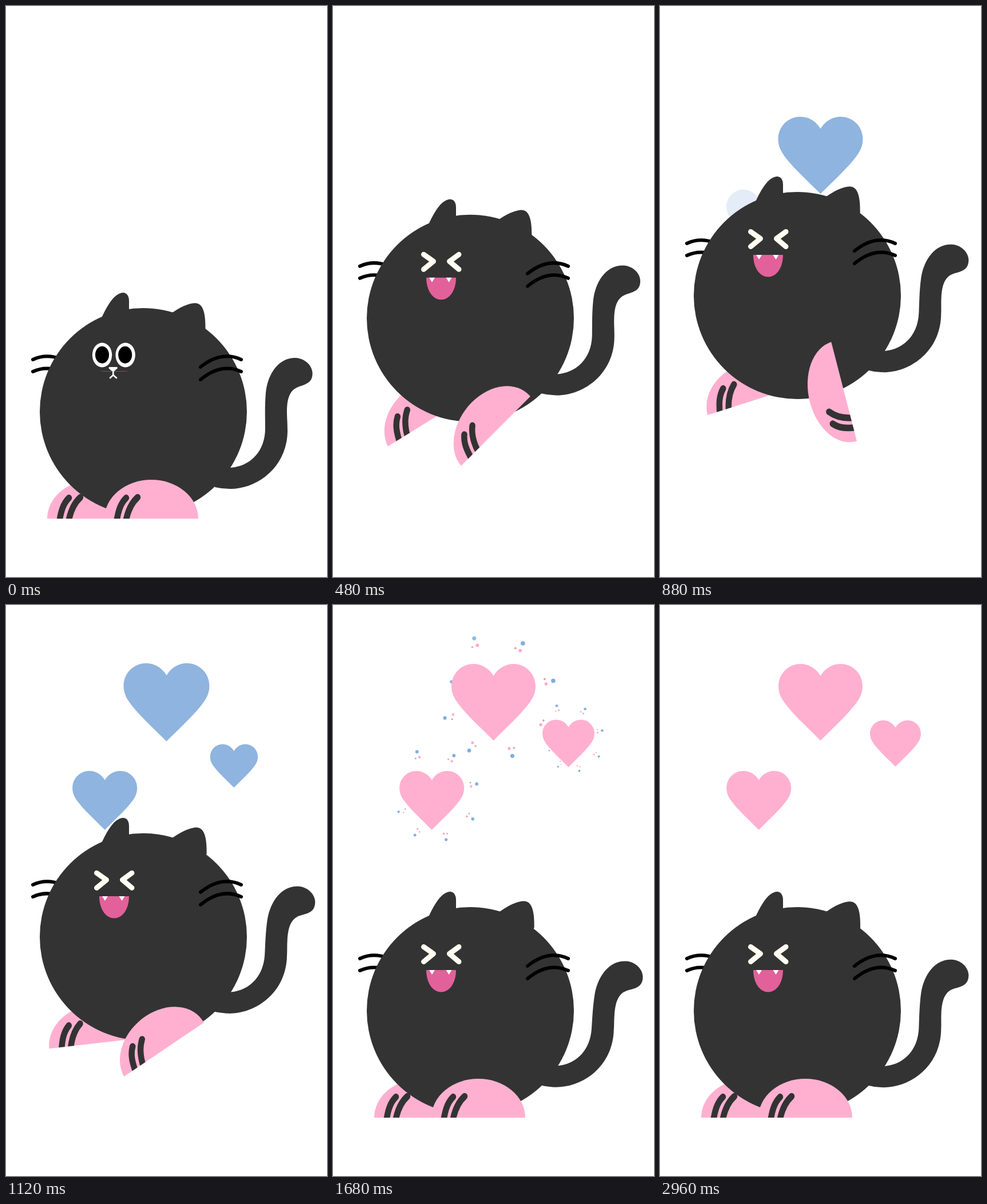
These frames come from a looping animation (561 px wide and 998 px high, 3 s). An HTML page:

```html
<!DOCTYPE html>
<html lang="en">
<head>
<meta charset="utf-8">
<title>Jumping cat</title>
<style>
  html, body { margin: 0; width: 100%; height: 100%; overflow: hidden; background: #fff; }
  svg { display: block; width: 100%; height: 100%; }
  .fur { fill: #333; }
  .line { fill: none; stroke-linecap: round; stroke-linejoin: round; }
  .whisker { stroke: #000; stroke-width: 6; }
  .toe { stroke: #333; stroke-width: 10.5; }
  .squint { stroke: #fffff2; stroke-width: 9; }
</style>
</head>
<body>
<svg viewBox="0 0 561 998">
  <defs>
    <clipPath id="sole"><rect x="-90" y="-70" width="180" height="70"/></clipPath>
    <path id="heart" d="M0-46C-8-60-22-67-35-67C-56-67-73.5-50-73.5-28C-73.5-18-70-9-63.5 0C-50 19-26 41 0 67C26 41 50 19 63.5 0C70-9 73.5-18 73.5-28C73.5-50 56-67 35-67C22-67 8-60 0-46Z"/>
    <g id="foot" clip-path="url(#sole)">
      <ellipse rx="82" ry="62" fill="#ffb0d0"/>
      <path class="line toe" d="M-61 6C-58-12-54-24-44-33M-45 6C-42-10-36-24-24-34"/>
    </g>
    <path id="whiskers" class="line whisker" d="M340 631Q376 602 411 618M340 653Q376 623 411 639"/>
  </defs>
  <g id="sparks"></g>
  <g id="hearts"></g>
  <g id="cat">
    <path id="tail" class="fur" d="M365 841Q378 844 392 844C440 844 492 805 492 742C492 725 491 722 491 710C491 690 494 674 508 667C514 664 521 663 527 659C534 655 536 648 535.5 640C534 626 520 615 505 615C478 615 458 640 454 676C452 700 453 720 453 738C453 780 425 805 392 807Q380 807 360 800Z"/>
    <use href="#whiskers" transform="matrix(-1 0 0 1 458 0)"/>
    <use id="rear" href="#foot"/>
    <path class="fur" d="M164 552C172 533 183 512 194 505Q200 501 205 501Q215 502 215 516L215 550Z"/>
    <path id="ear" class="fur" d="M285 540Q308 523 324 520C343 515 349 532 348.5 565L340 585Z"/>
    <circle class="fur" cx="240" cy="709" r="181"/>
    <use id="front" href="#foot"/>
    <use href="#whiskers"/>
    <g id="calm">
      <g fill="#fff">
        <ellipse cx="168" cy="610" rx="17.2" ry="21.5"/>
        <ellipse cx="208.7" cy="610" rx="17.2" ry="21.5"/>
      </g>
      <ellipse cx="168" cy="609.7" rx="12" ry="15"/>
      <ellipse cx="208.2" cy="609.7" rx="12" ry="15"/>
      <path d="M181 632.5H193.5L187.3 638Z" fill="#fff" stroke="#fff" stroke-width="3" stroke-linejoin="round"/>
      <path class="line" stroke="#fff" stroke-width="2.6" d="M187.3 638V645M182 650L187.3 645L193 650"/>
    </g>
    <path id="squint" class="line squint" d="M158.5 597.5L175.5 609.5L158.5 623.5M220 597.5L203.5 609.5L220 623.5"/>
    <g id="mouth">
      <path fill="#e2619a" d="M-26 0H26C26 22 15 38.5 0 38.500S-26 22-26 0Z"/>
      <path fill="#fff" d="M-21 0H-11L-16 8ZM8.500 0H18.500L13.500 8Z"/>
    </g>
  </g>
</svg>
<script>
const LOOP = 3000, STEP = 40, GROUND = 896;
const BLUE = [143, 180, 223], PINK = [255, 176, 208];
const $ = id => document.getElementById(id);
const linear = p => p;
const smooth = p => (1 - Math.cos(Math.PI * p)) / 2;
const clamp = p => Math.min(1, Math.max(0, p));

// Value at time t from [time, value] steps
function track(t, steps, ease = smooth) {
  let [t0, v0] = steps[0];
  for (const [t1, v1] of steps) {
    if (t <= t1) return t1 === t0 ? v1 : v0 + (v1 - v0) * ease((t - t0) / (t1 - t0));
    t0 = t1; v0 = v1;
  }
  return v0;
}

const jump = [[286, 0], [560, -203], [960, -203], [1348, 0]];
const frontTurn = [[170, 0], [880, 105.8], [1260, 0]];
const rearTurn = [[60, 0], [280, 36.5], [480, 29.4], [880, 16.2], [1260, 0]];
const tailTurn = [[0, 0], [480, 1], [880, 2.7], [1280, 3.8], [1680, 4.3], [2320, 4.3], [2960, 2.7]];
const earShift = [[0, 0], [480, -1.2], [880, 1.2], [1280, 2.8], [1680, 3.2], [2320, 3.2], [2960, 1.6]];

const hearts = [
  { x: 280.5, y: 170, size: 1, dx: 0, dy: 220, rise: [680, 1040], show: [640, 720], burst: 996, blush: 1360,
    scale: [[880, 1.007], [1060, 1.03], [1280, .973], [1500, 1]] },
  { x: 172.7, y: 341.5, size: .769, dx: 0, dy: 40, rise: [780, 1100], show: [840, 1000], burst: 1055, blush: 1400,
    scale: [[880, .769], [1100, .769], [1280, .782], [1500, .769]] },
  { x: 411.5, y: 242, size: .61, dx: -20, dy: 60, rise: [960, 1360], show: [960, 1080], burst: 1145, blush: 1440,
    scale: [[960, .5], [1280, .633], [1680, .618], [2320, .605]] },
];
// Three dots travel together in each of eight directions
const dots = [
  { color: "#80aede", reach: 116, side: 0, size: 4, delay: 0 },
  { color: "#ffa9cb", reach: 103, side: 2, size: 3, delay: 40 },
  { color: "#d3a79f", reach: 102, side: -8, size: 2, delay: 0 },
];

function add(parent, name, attrs) {
  const el = document.createElementNS("http://www.w3.org/2000/svg", name);
  for (const key in attrs) el.setAttribute(key, attrs[key]);
  return parent.appendChild(el);
}
const place = (el, value) => el.setAttribute("transform", value);
const show = (el, on) => el.setAttribute("visibility", on ? "visible" : "hidden");

const sparks = [];
for (const heart of hearts) {
  heart.el = add($("hearts"), "use", { href: "#heart" });
  for (let i = 0; i < 8; i++)
    for (const dot of dots)
      sparks.push({ heart, dot, start: heart.burst + i * 66 + dot.delay,
        angle: i * 45 - 107, el: add($("sparks"), "circle", { fill: dot.color }) });
}

function drawHeart(h, t) {
  const left = 1 - smooth(clamp((t - h.rise[0]) / (h.rise[1] - h.rise[0])));
  const mix = clamp((t - h.blush) / 120);
  const color = BLUE.map((c, i) => Math.round(c + (PINK[i] - c) * mix));
  place(h.el, `translate(${h.x + h.dx * left} ${h.y + h.dy * left}) scale(${track(t, h.scale)})`);
  h.el.setAttribute("fill", `rgb(${color})`);
  h.el.setAttribute("opacity", clamp((t - h.show[0]) / (h.show[1] - h.show[0])));
}

// Dots slow down on a slight clockwise spiral
function drawSpark({ heart, dot, start, angle, el }, t) {
  const age = t - start;
  const out = age > 0 ? 1 - Math.exp(-age / 190) : 0;
  const fade = 1 - clamp((age - 650) / 240);
  const a = (angle - 15 * (1 - out)) * Math.PI / 180;
  const c = Math.cos(a), s = Math.sin(a);
  const r = dot.reach * out, side = dot.side * out;
  el.setAttribute("cx", heart.x + heart.size * (r * c - side * s));
  el.setAttribute("cy", heart.y - 4 * heart.size + heart.size * (r * s + side * c));
  el.setAttribute("r", dot.size * heart.size * out * (.3 + .7 * fade));
  el.setAttribute("opacity", age > 0 ? fade : 0);
}

const placeFoot = (id, x, turn, px, py) =>
  place($(id), `translate(${x} ${GROUND}) scale(1 1.097) rotate(${-turn} ${px} ${py})`);

function draw(t) {
  place($("cat"), `translate(0 ${track(t, jump)})`);
  placeFoot("front", 254, track(t, frontTurn), 27.2, -34.3);
  placeFoot("rear", 154, track(t, rearTurn, linear), -6, -28.8);
  place($("tail"), `rotate(${track(t, tailTurn, linear)} 408 725)`);
  const ear = track(t, earShift, linear);
  place($("ear"), `translate(${ear} ${-ear * .55})`);

  const laughing = t >= 280;
  show($("calm"), !laughing);
  show($("squint"), laughing);
  place($("mouth"), `translate(189 638) scale(1 ${track(t, [[240, .015], [400, 1]])})`);

  hearts.forEach(h => drawHeart(h, t));
  sparks.forEach(s => drawSpark(s, t));
}

const begin = performance.now();
function tick() {
  const t = (performance.now() - begin) % LOOP;
  draw(Math.floor(t / STEP) * STEP);
  requestAnimationFrame(tick);
}
tick();
</script>
</body>
</html>
```
